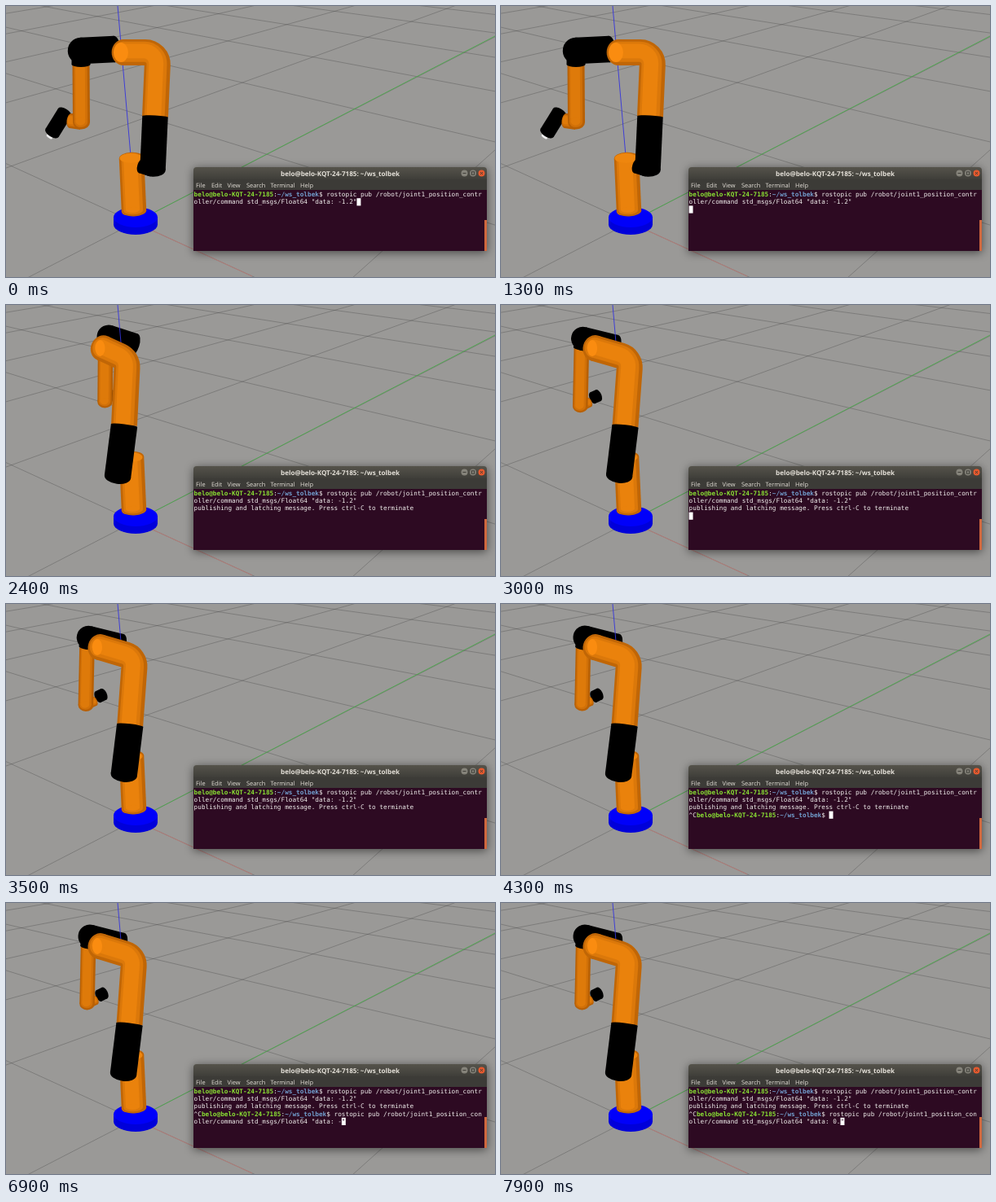
An HTML page with a canvas for the animation above (8 s loop, 600 by 333 pixels).

```html
<!DOCTYPE html>
<html lang="en">
<head>
<meta charset="utf-8">
<title>Robot arm joint command</title>
<style>
html, body { margin: 0; width: 100%; height: 100%; overflow: hidden; background: #9a9997; }
canvas { display: block; }
</style>
</head>
<body>
<canvas id="stage" width="600" height="333"></canvas>
<script>
const ctx = document.getElementById('stage').getContext('2d');
ctx.textRendering = 'geometricPrecision';

const LOOP = 8000;
const USER = 'belo@belo-KQT-24-7185', DIR = '~/ws_tolbek';
const ORANGE = ['#b86004', '#d07008', '#de7a0a'];
const LIT = ['#c06606', '#db780a', '#ea820c'];
const BLACK = ['#000'];
const WHITE = '#f2f0ee', BODY = '#2d0a22';

// ---------- ground plane ----------
const ORIGIN = [158, 266], VP_GREEN = [964, -150], VP_RED = [-750, -150];

// Perspective position k metres from the origin towards a vanishing point.
function along(vp, step, k) {
  const m = 1 / (1 + step * k);
  return vp.map((v, i) => v + (ORIGIN[i] - v) * m);
}

function line(a, b, color, width) {
  ctx.strokeStyle = color;
  ctx.lineWidth = width;
  ctx.beginPath();
  ctx.moveTo(...a);
  ctx.lineTo(...b);
  ctx.stroke();
}

// Line from a vanishing point through p, carried on across the stage.
function ray(vp, p, color, width) {
  line(vp, p.map((v, i) => vp[i] + (v - vp[i]) * 4), color, width);
}

function ground() {
  ctx.fillStyle = '#9a9997';
  ctx.fillRect(0, 0, 600, 333);
  const grey = 'rgba(60,60,60,.4)';
  for (let k = -1; k <= 8; k++) {
    ray(VP_GREEN, along(VP_RED, 0.2, k), grey, 0.8);
    ray(VP_RED, along(VP_GREEN, 0.252, k), grey, 0.8);
  }
  line(ORIGIN, [600, 37], '#4caa4c', 0.9);
  line(ORIGIN, [302, 332], '#b87c78', 0.9);
}

// ---------- robot ----------
// Each joint: x, y at rest, at the goal and at the overshoot.
const JOINTS = {
  tip:     [53, 161, 118, 111, 127, 111],
  wrist:   [72, 131, 114, 114, 124, 114],
  hand:    [56.5, 156, 121, 110.5, 130, 109],
  hook:    [79, 141, 110, 119, 124, 117],
  low:     [92.5, 143, 99.5, 124, 121.5, 119],
  high:    [92, 72, 101, 54, 122, 62],
  corner:  [92, 55, 103, 41, 126, 39],
  foreEnd: [133, 53, 142, 51, 157, 49],
  stub:    [144, 57, 115, 53, 118.5, 53],
  elbow:   [186.5, 57, 157.5, 66, 149, 67],
  mid:     [183, 136, 151.5, 149, 145, 148],
  foot:    [180, 201, 144, 210, 137, 211]
};
const SHOULDER = [154, 193];
const OVER = 1.3;
const SWING = [[2100, 0], [2400, OVER], [3000, 0.96], [4400, 1]];

function swing(t) {
  const i = SWING.findIndex(k => t < k[0]);
  if (i === 0) return 0;
  if (i < 0) return 1;
  const [t0, a] = SWING[i - 1], [t1, b] = SWING[i];
  const u = (t - t0) / (t1 - t0);
  return a + (b - a) * (i === 1 ? Math.sin(u * Math.PI / 2) : (1 - Math.cos(u * Math.PI)) / 2);
}

// Quadratic path through the three poses.
function pose(s) {
  const rest = (s - 1) * (s - OVER) / OVER;
  const goal = s * (s - OVER) / (1 - OVER);
  const over = s * (s - 1) / (OVER * (OVER - 1));
  const out = {};
  for (const name in JOINTS) {
    const j = JOINTS[name];
    out[name] = [0, 1].map(i => j[i] * rest + j[i + 2] * goal + j[i + 4] * over);
  }
  return out;
}

// Shaded pipe with a rounded bend; startCap and endCap give the roundness of its ends.
function tube(pts, w, colors, startCap, endCap) {
  colors.forEach((color, i) => {
    const width = w * (1 - i * 0.22), off = -i * w * 0.025;
    const path = pts.map(([x, y]) => [x + off, y + off]);
    const first = path[0], last = path.at(-1);
    ctx.strokeStyle = ctx.fillStyle = color;
    ctx.lineWidth = width;
    ctx.beginPath();
    ctx.moveTo(...first);
    if (path.length === 3) ctx.arcTo(...path[1], ...last, 15);
    ctx.lineTo(...last);
    ctx.stroke();
    const cap = (p, q, ratio) => {
      if (!ratio) return;
      const angle = Math.atan2(p[1] - q[1], p[0] - q[0]);
      ctx.beginPath();
      ctx.ellipse(...p, width / 2 * ratio, width / 2, angle, 0, 7);
      ctx.fill();
    };
    cap(first, path[1], startCap);
    cap(last, path.at(-2), endCap);
  });
}

function ellipse(x, y, rx, ry, color) {
  ctx.fillStyle = color;
  ctx.beginPath();
  ctx.ellipse(x, y, rx, ry, 0, 0, 7);
  ctx.fill();
}

function robot(t) {
  const s = swing(t), p = pose(s);
  const size = (rest, goal) => rest + (goal - rest) * Math.min(s, 1);

  ellipse(159, 268.5, 27, 12.5, '#0000da');
  ctx.fillRect(132, 259.5, 54, 9);
  ellipse(159, 259.5, 27, 12.5, '#0000fa');

  tube([p.hand, p.tip], 8, ['#f0f0f0'], 0, 0.3);
  tube([p.wrist, p.hand], size(19, 15), BLACK, 0.5, 0.5);
  tube([p.low, p.hook], size(18, 12), ORANGE, 0, 0.5);
  tube([p.high, p.low], size(21, 18.5), ORANGE, 0, 0.8);
  tube([p.corner, p.high], size(23, 20), BLACK, 1, 0.25);
  tube([p.corner, p.foreEnd], size(32.5, 29), BLACK, 1, 0.45);
  line([153, 184], [137, 0], '#3434dc', 0.9);
  tube([[154, 187], [157, 252]], 30.5, LIT, 0.48, 0.42);
  ellipse(153.5, 187, 14, 6, '#ee860e');
  tube([p.mid, p.elbow, p.stub], size(32, 32), LIT, 0, 0.9);
  ellipse(p.stub[0] - 3, p.stub[1], size(9, 6), size(12, 10), '#fa8c10');
  tube([p.foot, p.foot.map((v, i) => v + (SHOULDER[i] - v) * 0.55)], 18, BLACK, 0, 0.5);
  tube([p.foot, p.mid], size(31.5, 32.5), BLACK, 0.55, 0.1);
}

// ---------- terminal ----------
const CELL = 4.647, ROW = 9.2, LEFT = 230.6, TOP = 227;
const HEAD = 'rostopic pub /robot/joint1_position_con';
const TAIL = 'oller/command std_msgs/Float64 "data: ';
const EDITS = [[4900, '-1.2'], [6300, '-1.'], [6600, '-1'], [6800, '-'], [7000, ''], [7500, '0'], [7700, '0.']];

function print(row, col, text, color = WHITE, bold = '') {
  ctx.font = bold + ' 7.7px "DejaVu Sans Mono", monospace';
  ctx.textAlign = 'left';
  ctx.fillStyle = color;
  [...text].forEach((c, i) => ctx.fillText(c, LEFT + (col + i) * CELL, TOP + row * ROW + 7));
  return col + text.length;
}

function prompt(row, col) {
  col = print(row, col, USER, '#8ae234', 'bold');
  col = print(row, col, ':');
  col = print(row, col, DIR, '#729fcf', 'bold');
  return print(row, col, '$ ');
}

function cursor(row, col, under = '') {
  ctx.fillStyle = '#fff';
  ctx.fillRect(LEFT + col * CELL, TOP + row * ROW, CELL + 0.3, ROW);
  print(row, col, under, BODY);
}

function label(text, x, y, font, align) {
  ctx.font = font + ' "Open Sans", "Noto Sans", sans-serif';
  ctx.textAlign = align;
  ctx.fillStyle = '#e4e0d8';
  ctx.fillText(text, x, y);
}

function frame() {
  const bar = ctx.createLinearGradient(0, 198, 0, 213);
  bar.addColorStop(0, '#55534b');
  bar.addColorStop(1, '#3f3e39');
  ctx.fillStyle = bar;
  ctx.save();
  ctx.shadowColor = 'rgba(0,0,0,.55)';
  ctx.shadowBlur = 12;
  ctx.shadowOffsetY = 2;
  ctx.beginPath();
  ctx.roundRect(230, 198, 360, 103, [4, 4, 0, 0]);
  ctx.fill();
  ctx.restore();
  ctx.fillStyle = '#3c3b37';
  ctx.fillRect(230, 213, 360, 13);
  ctx.fillStyle = BODY;
  ctx.fillRect(230, 226, 360, 75);
  ctx.fillStyle = '#d0683e';
  ctx.fillRect(587, 263, 3, 38);

  label(USER + ': ' + DIR, 410, 208.5, 'bold 8.1px', 'center');
  const menu = { File: 233, Edit: 252, View: 271.5, Search: 295, Terminal: 324.5, Help: 361 };
  for (const item in menu) label(item, menu[item], 222.6, '7.4px', 'left');

  [562.5, 573, 583.5].forEach((x, i) => ellipse(x, 205.5, 4, 4, i < 2 ? '#85837a' : '#e5592e'));
  const ink = '#3a3934';
  line([560.5, 205.5], [564.5, 205.5], ink, 0.9);
  ctx.strokeRect(571.3, 203.8, 3.4, 3.4);
  line([582, 204], [585, 207], ink, 0.9);
  line([585, 204], [582, 207], ink, 0.9);
}

function terminal(t) {
  frame();
  print(0, prompt(0, 0), HEAD + 'tr');
  const end = print(1, 0, TAIL + '-1.2"');
  if (t < 700) cursor(1, end);
  else if (t >= 1300 && t < 1900) cursor(2, 0);
  if (t >= 2000) print(2, 0, 'publishing and latching message. Press ctrl-C to terminate');
  if (t < 4100) {
    if (t >= 2500 && t < 3100 || t >= 3700) cursor(3, 0);
    return;
  }
  const col = prompt(3, print(3, 0, '^C'));
  const edit = EDITS.findLast(e => t >= e[0]);
  if (!edit) {
    cursor(3, col);
    return;
  }
  print(3, col, HEAD);
  const quote = print(4, 0, TAIL + edit[1]);
  if (t < 5400) cursor(4, print(4, quote, '"'));
  else cursor(4, quote, '"');
}

function draw() {
  const t = Math.floor(performance.now() % LOOP / 100) * 100;
  ground();
  robot(t);
  terminal(t);
  requestAnimationFrame(draw);
}
draw();
</script>
</body>
</html>
```
